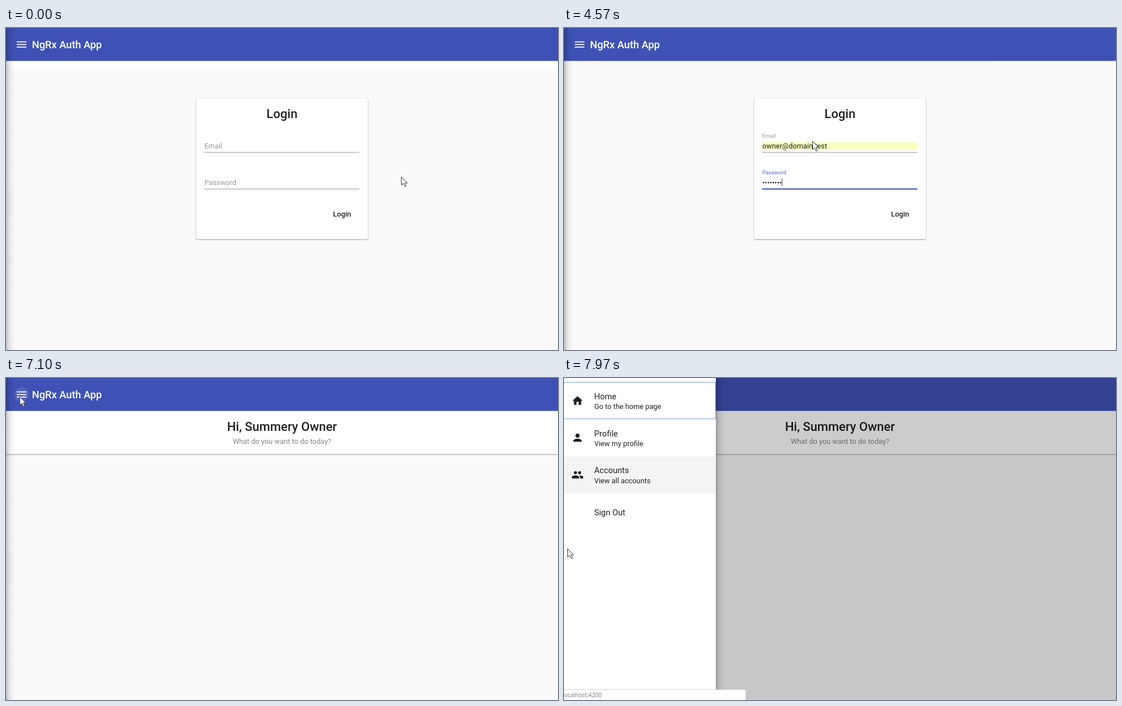
Animation of 978 by 572 pixels, one loop 8 s. Source, as an HTML page:

```html
<!DOCTYPE html>
<html lang="en">
<head>
<meta charset="utf-8">
<title>NgRx Auth App</title>
<style>
html, body { margin: 0; width: 100%; height: 100%; overflow: hidden; background: #fafafa; }
svg { display: block; width: 978px; height: 572px; }
text { font: 400 12.8px Roboto, sans-serif; fill: #212121; white-space: pre; }
.bar { font-size: 18.3px; font-weight: 500; fill: #fff; }
.title { font-size: 22px; font-weight: 500; text-anchor: middle; }
.sub { fill: #858585; text-anchor: middle; }
.button { font-weight: 500; }
.nav { font-size: 14.64px; }
.note { font-family: "Open Sans", sans-serif; font-size: 10.3px; fill: #777; }
.option { font-family: "Open Sans", sans-serif; font-size: 11.3px; }
.raised { fill: #fff; filter: drop-shadow(0 1px 1px rgba(0,0,0,.34)) drop-shadow(0 0 1px rgba(0,0,0,.1)); }
.popup { fill: #fff; filter: drop-shadow(0 1px 2px rgba(0,0,0,.4)); }
</style>
</head>
<body>
<svg viewBox="0 0 978 572">
  <defs>
    <linearGradient id="shade">
      <stop offset="0" stop-opacity=".24"/><stop offset=".4" stop-opacity=".08"/><stop offset="1" stop-opacity="0"/>
    </linearGradient>
    <clipPath id="track"><rect x="351" y="172" width="275" height="4"/></clipPath>
  </defs>
  <rect width="978" height="572" fill="#fafafa"/>
  <rect id="strip" y="58" width="978" height="14" fill="#fff"/>

  <g id="login">
    <rect id="card" class="raised" x="337" y="125" width="304" height="250" rx="2"/>
    <text class="title" x="489" y="160">Login</text>
    <g id="progress" clip-path="url(#track)">
      <rect x="351" y="172" width="275" height="4" fill="#c5cae9"/>
      <rect id="runner" y="172" height="4" fill="#3f51b5"/>
    </g>
    <g id="form">
      <rect id="fill" x="351" y="203" width="275" height="13.5" fill="#f9fdbd"/>
      <text id="value" x="351.5" y="214">owner@domain.test</text>
      <rect x="351" y="220.5" width="275" height="1" fill="#949494"/>
      <rect id="emailLine" y="220" height="2" fill="#3f51b5"/>
      <text id="emailLabel">Email</text>
      <rect x="351" y="285.5" width="275" height="1" fill="#949494"/>
      <rect id="passLine" y="285" height="2" fill="#3f51b5"/>
      <text id="passLabel">Password</text>
      <text id="dots" x="351.5" y="279"></text>
      <rect id="caret" width="1" height="14" fill="#444"/>
      <text id="submit" class="button" x="579.5" y="335">Login</text>
    </g>
    <g id="menu">
      <rect class="popup" x="351" y="217.5" width="275" height="47" rx="1"/>
      <rect id="pick" x="352" y="224" width="273.5" height="33.5" fill="#e8e9ed"/>
      <text class="option" x="362" y="245">owner@domain.test</text>
    </g>
  </g>

  <g id="home">
    <rect class="raised" x="-4" y="50" width="986" height="85"/>
    <text class="title" x="489" y="94">Hi, Summery Owner</text>
    <text class="sub" x="489" y="117">What do you want to do today?</text>
  </g>

  <rect width="978" height="58.5" fill="#3f51b5"/>
  <circle id="ripple" cx="27.5" cy="29.5" fill="#fff"/>
  <path d="M19 24.7h17.2M19 29.3h17.2M19 33.9h17.2" stroke="#fff" stroke-width="1.8"/>
  <text class="bar" x="46" y="35.7">NgRx Auth App</text>

  <rect id="backdrop" width="978" height="572"/>
  <g id="drawer">
    <rect x="269" width="16" height="572" fill="url(#shade)"/>
    <rect width="269" height="572" fill="#fff"/>
    <rect id="hover" width="269" height="65.5" fill="#f4f4f4"/>
    <rect id="focus" x="-1" y="7.5" width="269.5" height="65" fill="none" stroke="#7da3e6"/>
    <g fill="#1d1d1d">
      <path transform="translate(13 29.5) scale(.915)" d="M10 20v-6h4v6h5v-8h3L12 3 2 12h3v8z"/>
      <g transform="translate(13 95) scale(.915)">
        <circle cx="12" cy="8" r="4"/>
        <path d="M4 20v-2c0-2.7 5.3-4 8-4s8 1.3 8 4v2z"/>
      </g>
      <g transform="translate(13 161) scale(.915)">
        <circle cx="8" cy="8" r="3"/><circle cx="16" cy="8" r="3"/>
        <path d="M1 19v-2.5c0-2.3 4.7-3.5 7-3.5s7 1.2 7 3.5V19zM17 19v-2.5c0-1.5-.8-2.6-2-3.4 2.300-.4 8 .8 8 3.400V19z"/>
      </g>
    </g>
    <text class="nav" x="53.500" y="37.500">Home</text><text x="53.500" y="54.700">Go to the home page</text>
    <text class="nav" x="53.500" y="103.500">Profile</text><text x="53.500" y="120.700">View my profile</text>
    <text class="nav" x="53.500" y="169.300">Accounts</text><text x="53.500" y="186.500">View all accounts</text>
    <text class="nav" x="53.500" y="244.300">Sign Out</text>
  </g>

  <g id="status">
    <rect x="-4" y="553.5" width="326" height="24" rx="2" fill="#fff" stroke="#d4d4d4"/>
    <text id="note" class="note" x="-2.6" y="567"></text>
  </g>
  <path id="cursor" d="M.5.5V15.200L4 12l2.700 5.700 2.300-1L6.500 11.200H11z" fill="#fff" stroke="#333" stroke-width="1" stroke-linejoin="round"/>
</svg>
<script>
const LOOP = 8000;
const el = {};
document.querySelectorAll('[id]').forEach(n => el[n.id] = n);

const set = (id, attrs) => { for (const k in attrs) el[id].setAttribute(k, attrs[k]); };
const show = (id, on) => set(id, { opacity: +on });
const within = (t, a, b) => t >= a && t < b;
const ramp = (t, a, b) => Math.min(1, Math.max(0, (t - a) / (b - a)));
const mix = (a, b, p) => a + (b - a) * p;

// cubic-bezier(.25, .8, .25, 1)
function swift(x) {
  const curve = (a, b, u) => 3 * u * (1 - u) ** 2 * a + 3 * u * u * (1 - u) * b + u ** 3;
  let lo = 0, hi = 1;
  for (let i = 0; i < 24; i++) {
    const mid = (lo + hi) / 2;
    if (curve(.25, .25, mid) < x) lo = mid; else hi = mid;
  }
  return curve(.8, 1, hi);
}

// Cursor stops: time, x, y
const path = [
  [400, 700, 264], [570, 640, 222], [760, 545, 156], [890, 480, 130],
  [990, 448, 162], [1070, 439, 197], [1269, 439, 197], [1270, 440, 201],
  [5900, 440, 201], [6250, 405, 140], [6500, 250, 85], [6800, 80, 45],
  [7020, 24, 33], [7450, 24, 33], [7600, 20, 70], [7750, 14, 125],
  [7870, 8, 190], [7930, 6, 255], [7970, 6, 303]
];
function cursorAt(t) {
  let i = path.findIndex(p => p[0] > t);
  if (i < 0) i = path.length;
  const a = path[Math.max(0, i - 1)], b = path[Math.min(i, path.length - 1)];
  const p = a === b ? 0 : ramp(t, a[0], b[0]);
  return [mix(a[1], b[1], p), mix(a[2], b[2], p)];
}

const floatSteps = [[1500, .35], [1570, .65], [1730, .95], [1800, 1]];
const held = (t, steps) => steps.reduce((v, s) => t >= s[0] ? s[1] : v, 0);
const keyTimes = [3470, 3630, 3800, 3930, 4050, 4170, 4300, 4430];

function label(id, rest, p, color) {
  set(id, { x: 351.5, y: mix(rest, rest - 19, p) });
  el[id].style.fontSize = mix(12.8, 9.6, p) + 'px';
  el[id].style.fill = color;
}
function line(id, p, on) {
  const w = 275 * p;
  set(id, { x: 488.5 - w / 2, width: w, opacity: +on });
}

function drawLogin(t) {
  const busy = within(t, 4630, 5430);
  set('card', { height: busy ? 277 : 250 });
  set('form', { transform: `translate(0 ${busy ? 27 : 0})` });
  show('progress', busy);
  const lap = (t - 4630) % 1000 / 1000;
  set('runner', { x: mix(201, 640, lap), width: mix(60, 190, lap) });

  const up = held(t, floatSteps);
  const emailOn = within(t, 1500, 3170);
  const emailColor = !emailOn ? '#999' : t >= 2770 ? '#b57b6c' : '#5566c0';
  label('emailLabel', 214, up, emailColor);
  line('emailLine', up, emailOn);
  show('fill', t >= 2770);
  show('value', t >= 2770);

  const passUp = swift(ramp(t, 3170, 3470));
  const passOn = t >= 3170 && !busy;
  label('passLabel', 279, passUp, passOn ? '#5566c0' : '#999');
  line('passLine', passUp, passOn);

  const count = keyTimes.filter(k => t >= k).length;
  el.dots.textContent = '•'.repeat(count);
  const inEmail = within(t, 1570, 2770);
  show('caret', inEmail || passOn);
  set('caret', { x: 351 + count * 4.35, y: inEmail ? 203 : 267 });

  const ink = busy ? '#999' : '#212121';
  for (const id of ['value', 'dots', 'submit']) el[id].style.fill = ink;

  show('menu', ramp(t, 2000, 2200) * (1 - ramp(t, 3070, 3170)));
  show('pick', t >= 2770);
}

function drawDrawer(t) {
  const open = swift(ramp(t, 7117, 7517));
  set('drawer', { transform: `translate(${-269 * (1 - open)} 0)`, opacity: +(open > 0) });
  set('backdrop', { opacity: .2 * open });
  set('hover', { y: t < 7830 ? 73.5 : 139.5, opacity: +(t >= 7710) });
  show('focus', t >= 7517);
  const wave = ramp(t, 7030, 7100);
  set('ripple', { r: 13 * wave, opacity: .1 * (1 - ramp(t, 7150, 7400)) });
}

function draw(t) {
  const home = t >= 5430;
  show('strip', t < 100);
  show('login', !home);
  show('home', home);
  if (!home) drawLogin(t);
  drawDrawer(t);

  show('status', within(t, 5500, 6150) || t >= 7517);
  el.note.textContent = t < 7000 ? 'Czekam na ngrx-auth-server.herokuapp.com...' : 'localhost:4200';

  set('cursor', { transform: `translate(${cursorAt(t)})` });
}

const start = performance.now();
function tick() {
  draw((performance.now() - start) % LOOP);
  requestAnimationFrame(tick);
}
draw(0);
requestAnimationFrame(tick);
</script>
</body>
</html>
```
